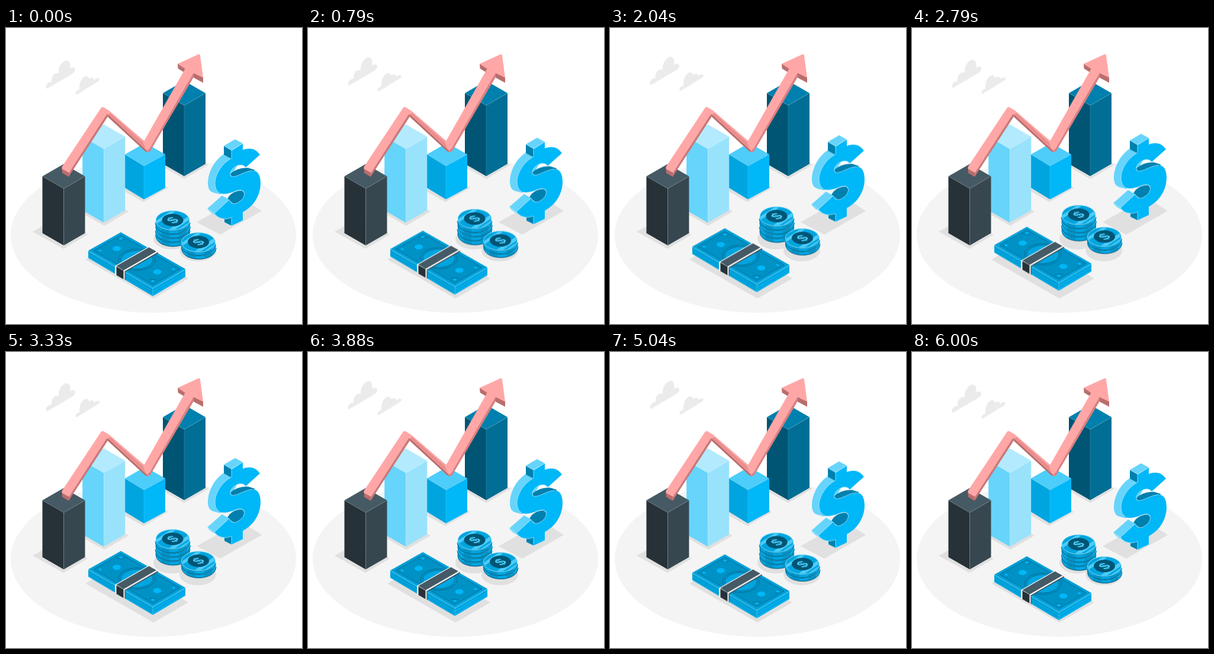
Recreate the animation shown at these times as an HTML page. Size 500 by 500 pixels, loop 6.04 s.

```html
<!DOCTYPE html>
<html lang="en">
<head>
<meta charset="utf-8">
<title>Growth chart</title>
<style>
  html, body { margin: 0; width: 100%; height: 100%; overflow: hidden; background: #fff; }
  svg { display: block; width: 100vw; height: 100vh; }
  .shadow { fill: #e0e0e0; }
  .main { fill: #00b7f8; }
  .dark { fill: #0080ae; }
  .light { fill: #66d4fb; }
  .edge { fill: none; stroke: #c8f0fe; stroke-width: .7; }
  .print { fill: none; stroke: #006c94; stroke-width: .9; }
  .seam { fill: none; stroke: #0085b3; stroke-width: .6; }
  .coin-sign { font: 700 24px "Liberation Sans", Arial, sans-serif; text-anchor: middle; fill: #4dcdfa; }
</style>
</head>
<body>
<svg viewBox="0 0 500 500">
  <ellipse cx="249" cy="349.5" rx="241" ry="131.5" fill="#f4f4f4"/>

  <g id="clouds" fill="#ebebeb">
    <path d="M68 102C66 98 70 91 77 91C76 82 82 74 89 77C88 64 96 55 103 55C109 56 109 63 108 69C112 65 117 66 117 70C117 74 114 76 111 78L72 101Q69 103 68 102Z"/>
    <path d="M118 112C116 109 119 105 124 104C123 95 127 84 134 81.5C138 80 140 84 141 86C145 81 149 84 149 88C152 84 157 84 158 86C158 89 155 91 151 93L122 111Q119 113 118 112Z"/>
  </g>

  <g class="shadow">
    <path d="M45 344L97 373L138 349L88 320Z"/>
    <path d="M113 304L166 334L207 310L157 281Z"/>
    <path d="M185 267L232 294L274 270L228 244Z"/>
    <path d="M250 226L301 255L342 231L292 202Z"/>
    <path d="M322 328L396 286L432 309L362 349Z"/>
    <path d="M134 391L193 357L308 423L249 457Z"/>
    <ellipse cx="280" cy="356" rx="31" ry="18"/>
    <ellipse cx="324" cy="376" rx="31" ry="18"/>
  </g>

  <g id="bars"></g>

  <g id="arrow" stroke-linejoin="round">
    <path d="M173 139L236 193L244 202L240 210L235 208L171 149Z" fill="#e98d8d"/>
    <path d="M171 148L173 151L235 208L239 210L236 205L173 147Z" fill="#b96d6d"/>
    <path d="M106 244L172 142L173 148L106 251Z" fill="#c97878"/>
    <path d="M94.500 237L106 244V251.500L95 245Z" fill="#b96d6d"/>
    <path d="M242 201L317 75V83L243.500 208L239 210Z" fill="#d98080"/>
    <path d="M290 60.500L305 69L301 75L290.500 68.500Z" fill="#b96d6d"/>
    <path d="M317 75L333 83V92.500L317 84Z" fill="#b96d6d"/>
    <path d="M94.500 234.500L160.500 135Q162 132.500 165 134L174 139.500L237 194.500L232 193L302.500 69L290 60.500L325 44.500Q327.500 43.500 328 46.500L333 84L316.500 76L243 203Q240 208 236 205L172.500 146L170 146L106.500 244.500L94.500 238Z" fill="#ffa7a7"/>
    <path d="M176 143.500L231 192.500L236 204L172.500 146Z" fill="#e98d8d"/>
  </g>

  <g class="float" id="dollar">
    <path class="light" d="M368 213C351 224 341 245 341 262C341 271 344 276 350 278L362 281L392 230L381 206Z"/>
    <path class="dark" d="M379 247C384 240 399 235 410 236.500L421 240L400 250L382 252Z"/>
    <path class="dark" d="M374 289C378 279 390 274 399 275L405 281L399 294L387 299Z"/>
    <path class="light" d="M340 305L365 283L377 290L352 313Z"/>
    <path class="light" d="M340 305L352 313C355 317 359 320 364 322L352 315Q344 311 340 305Z"/>
    <path class="dark" d="M369 320L381 318V334L369 328Z"/>
    <path class="main" d="M381 207L400 195V206C411 202 421 203 429 214L405 235.500C400 229 391 231 385 236C379 241 376 249 382 251C391 252 404 241 417 241C427 241 430 252 430 262C430 282 419 301 400 311V325L381 334V320C369 325 358 322 352 313L377 290C380 297 386 299 393 294C400 290 404 283 402 277C399 272 391 274 384 277C374 280 366 282 360 278C355 275 353 269 353 261C354 245 366 228 381 220Z"/>
    <path class="light" d="M368 199L387 188L400 195L381 206.500Z"/>
    <path class="dark" d="M368 199L381 206.500V221L368 214Z"/>
    <path class="edge" d="M368 199L381 206.500L400 195M381 206.500V220C366 228 354 245 353 261C353 269 355 275 360 278M340 305L352 313L377 290M352 313C358 322 369 325 381 320V334M405 235.500C400 229 391 231 385 236C379 241 376 249 382 251C391 252 404 241 417 241M377 290C380 297 386 299 393 294C400 290 404 283 402 277C399 272 391 274 384 277"/>
  </g>

  <g class="float" id="coins"></g>

  <g class="float" id="cash">
    <path d="M139 376L248 439V453L139 388.500Z" fill="#00a5df"/>
    <path d="M248 439L303 407V420.500L248 453Z" fill="#00aeec"/>
    <path class="seam" d="M139 380L248 443L303 411M139 384.500L248 448L303 416"/>
    <path d="M139 376L194 345L303 407L248 439Z" fill="#009fd7"/>
    <path class="edge" stroke-opacity=".5" d="M139 376.500L248 439.500L303 407.500M248 439V453"/>
    <path class="print" style="fill: #0091c5" d="M148 376L194 350L294 407L248 433.500Z"/>
    <path class="print" d="M155 376.500Q162 376 161 372.500M187 356Q194 360 201 356M241 426Q248 423 255 426M287 407Q280 407 281 411"/>
    <g fill="#00b7f8">
      <ellipse cx="187" cy="372.500" rx="7" ry="4.200"/>
      <ellipse cx="255.500" cy="412" rx="7" ry="4.200"/>
      <ellipse cx="159" cy="376" rx="3" ry="1.700"/>
      <ellipse cx="194" cy="356" rx="3" ry="1.700"/>
      <ellipse cx="248" cy="427.500" rx="3" ry="1.700"/>
      <ellipse cx="283" cy="407.500" rx="3" ry="1.700"/>
    </g>
    <ellipse class="print" cx="221" cy="391.500" rx="31" ry="18"/>
    <ellipse class="print" style="fill: #00a5df" cx="221" cy="391.500" rx="27" ry="15.500"/>
    <path d="M184 402L240 370L257.500 379.500L201 412V426L184 416Z" fill="#f4f8fa"/>
    <path d="M186.500 402L241.500 370.500L254 377.500L198.500 409.500Z" fill="#455a64"/>
    <path d="M186.500 403L198.500 410V424.500L186.500 417.500Z" fill="#263238"/>
    <path d="M200.500 411L256 379L257.500 380L201.500 412V426L200.500 425.500Z" fill="#37474f"/>
  </g>
</svg>
<script>
const get = id => document.getElementById(id);

// x, y: left corner of the roof; w: half width; h: wall height
const bars = [
  { x: 265, y: 110, w: 36, h: 119.5, colors: ['#0080ae', '#005574', '#006e95'] },
  { x: 201, y: 213.5, w: 34, h: 56.5, mid: 32, colors: ['#4dcdfa', '#00a5df', '#00b7f8'] },
  { x: 129.2, y: 183.5, w: 36, h: 124.5, colors: ['#b3eafd', '#66d4fb', '#99e2fc'] },
  { x: 61.5, y: 250.5, w: 36, h: 96, colors: ['#455a64', '#263238', '#37474f'] }
];

function bar({ x, y, w, h, mid = w, colors }) {
  const rise = w * .577, right = x + 2 * w, front = x + mid;
  const [roof, left, side] = colors;
  return `<path d="M${x} ${y}L${x + w} ${y - rise}L${right} ${y}L${front} ${y + rise}Z" fill="${roof}"/>
    <path d="M${x} ${y}L${front} ${y + rise}v${h}L${x} ${y + h}Z" fill="${left}"/>
    <path d="M${right} ${y}L${front} ${y + rise}v${h}L${right} ${y + h}Z" fill="${side}"/>
    <path d="M${x} ${y}L${front} ${y + rise}L${right} ${y}M${front} ${y + rise}v${h}" fill="none" stroke="#fff" stroke-opacity=".25" stroke-width=".6"/>`;
}

const RX = 28.5, RY = 16.5;

function coinSide(x, y, h) {
  const l = x - RX, r = x + RX, arc = `A${RX} ${RY} 0 0 0 `;
  return `<path d="M${l} ${y}v${h}${arc}${r} ${y + h}v${-h}Z" fill="#0093c7"/>
    <path d="M${l} ${y + h / 2}${arc}${r} ${y + h / 2}" fill="none" stroke="#00a9e5" stroke-width="3" stroke-dasharray="16 14"/>
    <path d="M${l} ${y + h}${arc}${r} ${y + h}" fill="none" stroke="#005574" stroke-width=".9"/>
    <ellipse cx="${x}" cy="${y}" rx="${RX}" ry="${RY}" fill="#00a5df" stroke="#b3eafd" stroke-width=".8"/>`;
}

function coinStack(id, x, y, count, h) {
  let out = `<clipPath id="${id}"><ellipse cx="${x}" cy="${y}" rx="${RX - 1}" ry="${RY - 1}"/></clipPath>`;
  for (let i = count - 1; i >= 0; i--) out += coinSide(x + (i % 2 ? .6 : 0), y + i * h, h);
  return out + `<g clip-path="url(#${id})" stroke="#4dcdfa">
      <path d="M${x - 30} ${y + 5}l36 -24" stroke-width="5"/>
      <path d="M${x - 8} ${y + 20}l40 -27" stroke-width="6"/>
      <path d="M${x + 4} ${y + 20}l30 -20" stroke-width="2"/>
    </g>
    <ellipse cx="${x}" cy="${y - .5}" rx="18" ry="10.6" fill="#005574"/>
    <text class="coin-sign" transform="matrix(.8 -.46 .8 .46 ${x} ${y - .5})" y="8.3">$</text>`;
}

get('bars').innerHTML = bars.map(bar).join('');
get('coins').innerHTML = coinStack('c1', 281.5, 325, 4, 6.9) + coinStack('c2', 325, 362, 2, 6);

// Steady bobbing, with a short rest at the end of each loop
const LOOP = 6040, LIFT = -10;

function bob(el, half) {
  const steps = [];
  for (let i = 0; i * half <= 6000; i++) {
    steps.push({ offset: i * half / LOOP, transform: `translateY(${i % 2 ? LIFT : 0}px)` });
  }
  steps.push({ offset: 1, transform: 'translateY(0px)' });
  el.animate(steps, { duration: LOOP, iterations: Infinity, easing: 'linear' });
}

document.querySelectorAll('.float').forEach(el => bob(el, 3000));
bob(get('clouds'), 1500);
</script>
</body>
</html>
```
